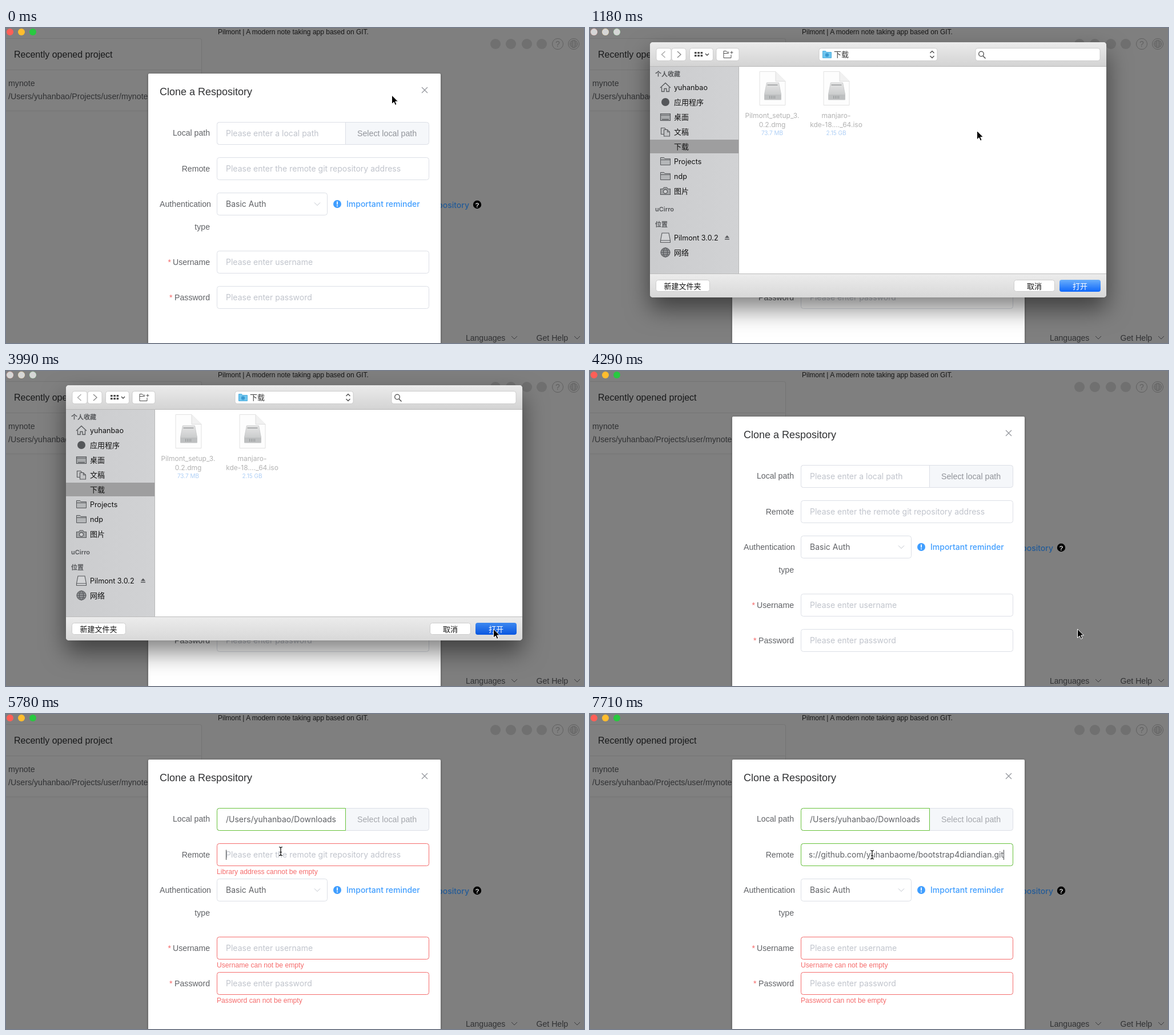
An HTML page that plays this animation: 1012x553 px, repeating every 8000 ms.

```html
<!DOCTYPE html>
<html lang="en">
<head>
<meta charset="utf-8">
<title>Clone a repository</title>
<style>
html, body { margin: 0; width: 100%; height: 100%; overflow: hidden; background: #7f7f7f; }
svg { display: block; width: 1012px; height: 553px; }
text { white-space: pre; }
.h { font-family: "Liberation Sans", Arial, sans-serif; }
.i { font-family: Inter, "Noto Sans CJK SC", "Noto Sans CJK", sans-serif; }
.c { font-family: "Noto Sans CJK SC", "Noto Sans CJK", sans-serif; }
.m { text-anchor: middle; }
.e { text-anchor: end; }
.b { font-weight: 500; }
.sb { font-weight: 600; }
#panelBox { filter: drop-shadow(0 20px 21px rgba(0, 0, 0, .5)); }
.btn { fill: #fff; stroke: #c4c4c4; stroke-width: .8; }
</style>
</head>
<body>
<svg id="stage" viewBox="0 0 1012 553">
<defs>
  <linearGradient id="bar" x2="0" y2="1"><stop stop-color="#ebebeb"/><stop offset="1" stop-color="#d3d3d3"/></linearGradient>
  <linearGradient id="foot" x2="0" y2="1"><stop stop-color="#ececec"/><stop offset="1" stop-color="#d8d8d8"/></linearGradient>
  <linearGradient id="side" x2="1" y2="0"><stop stop-color="#cbccce"/><stop offset="1" stop-color="#d1d2d4"/></linearGradient>
  <linearGradient id="blue" x2="0" y2="1"><stop stop-color="#69aefb"/><stop offset="1" stop-color="#0f68fb"/></linearGradient>
  <linearGradient id="down" x2="0" y2="1"><stop stop-color="#3d88f0"/><stop offset="1" stop-color="#0a57e0"/></linearGradient>
  <linearGradient id="disk" x2="0" y2="1"><stop stop-color="#e6e6e6"/><stop offset="1" stop-color="#bfc1c2"/></linearGradient>
  <clipPath id="field"><rect x="384" y="228" width="342" height="38"/></clipPath>
</defs>
</svg>
<script>
const LOOP = 8000, STEP = 148.2;
const USER = 'yuhanbao', APP = 'Pilmont';

const text = (x, y, s, size, fill, cls = 'h') =>
  `<text x="${x}" y="${y}" font-size="${size}" fill="${fill}" class="${cls}">${s}</text>`;
const rect = (x, y, w, h, fill, extra = '') =>
  `<rect x="${x}" y="${y}" width="${w}" height="${h}" fill="${fill}" ${extra}/>`;
const circle = (x, y, r, fill, extra = '') => `<circle cx="${x}" cy="${y}" r="${r}" fill="${fill}" ${extra}/>`;
const line = (d, stroke, w = 1, fill = 'none') => `<path d="${d}" stroke="${stroke}" stroke-width="${w}" fill="${fill}"/>`;
const group = (id, body) => `<g id="${id}">${body}</g>`;
const box = (y, stroke, x = 369, w = 372, fill = '#fff') =>
  rect(x + .5, y + .5, w - 1, 39, fill, `rx="4" stroke="${stroke}"`);
const globe = (x, y, r, c) => circle(x, y, r, 'none', `stroke="${c}"`) +
  `<ellipse cx="${x}" cy="${y}" rx="${r * .45}" ry="${r}" fill="none" stroke="${c}"/>` +
  line(`M${x - r} ${y}h${2 * r}M${x - r * .85} ${y - r / 2}h${r * 1.7}M${x - r * .85} ${y + r / 2}h${r * 1.7}`, c);

const lights = colors => colors.map((c, i) => circle(7 + 20 * i, 7, 6, c)).join('');

function backdrop() {
  const ink = '#18191a', grey = '#303133', icon = '#707070';
  return rect(0, 0, 1012, 553, '#7f7f7f') +
    text(371, 11, APP + ' | A modern note taking app based on GIT.', 12, '#161616') +
    rect(-4, 18.5, 346.5, 126.5, '#808080', 'rx="3" stroke="#747474"') +
    line('M0 73.5H342', '#757575') + line('M0 146H342', '#7a7a7a') +
    text(14, 52, 'Recently opened project', 16, ink) +
    text(4, 102, 'mynote', 14.2, grey) +
    text(4, 125, `/Users/${USER}/Projects/user/mynote`, 14.2, grey) +
    [857, 884, 912, 938].map(x => circle(x, 28, 9, icon)).join('') +
    circle(966, 28, 9.5, 'none', 'stroke="#606060"') + text(966, 33, '?', 14, '#606060', 'h m') +
    circle(994, 28, 9.5, 'none', 'stroke="#606060"') + globe(994, 28, 6.5, '#606060') +
    text(811, 316, 'repository', 14, '#225b98', 'i b e') +
    circle(825, 310, 7.2, '#000') + text(825, 314.5, '?', 11.5, '#ddd', 'h m sb') +
    text(805, 549, 'Languages', 14, grey) + text(928.5, 549, 'Get Help', 14.1, grey) +
    line('M885 541l5 5 5-5M995 541l5 5 5-5', '#3a3b3d');
}

function form() {
  const ink = '#606266', hint = '#c0c4cc', edge = '#dcdfe6', red = '#f56c6c', green = '#67c23a';
  const label = (y, s) => text(357, y, s, 14.1, ink, 'h e');
  const ph = (y, s) => text(385, y, s, 14, hint, 'i');
  const err = (y, s) => text(369, y, s, 12.15, red);
  const pathEdge = 'M594.5 165.5H373.5a4 4 0 0 0-4 4v31a4 4 0 0 0 4 4H594.5Z';
  return rect(249, 80, 512, 480, '#fff', 'rx="2" style="filter:drop-shadow(0 1px 2px #0005)"') +
    text(269, 118, 'Clone a Respository', 18, '#303133') +
    line('M728 104l10 10M738 104l-10 10', '#909399', 1.1) +
    label(189, 'Local path') + label(252, 'Remote') +
    text(269, 314, 'Authentication', 14.2, ink) + label(354, 'type') +
    label(416, 'Username') + label(478, 'Password') +
    text(283.5, 416, '*', 14, red) + text(286, 478, '*', 14, red) +
    box(165, edge, 369, 372, '#f5f7fa') + line(pathEdge, edge, 1, '#fff') +
    group('pick', text(615, 190, 'Select local path', 14.2, '#909399')) +
    box(227, edge) + box(289, edge, 369, 194) + box(391, edge) + box(453, edge) +
    text(385, 314, 'Basic Auth', 14, ink, 'i') + line('M540 306.5l5 5 5-5', hint) +
    circle(580, 309, 7, '#409eff') + rect(579.1, 304.5, 1.8, 5.5, '#fff') + circle(580, 312.3, 1.1, '#fff') +
    text(596, 314, 'Important reminder', 14, '#409eff', 'i b') +
    group('pathHint', ph(190, 'Please enter a local path')) +
    group('pathValue', text(385, 190, `/Users/${USER}/Downloads`, 14, ink, 'i')) +
    group('pathOk', line(pathEdge, green)) +
    group('errors', box(391, red) + box(453, red) +
      err(445, 'Username can not be empty') + err(507, 'Password can not be empty')) +
    group('remoteError', box(227, red) + err(281, 'Library address cannot be empty')) +
    group('remoteOk', box(227, green, 369, 372, 'none')) +
    group('remoteHint', ph(252, 'Please enter the remote git repository address')) +
    group('remoteValue', `<g clip-path="url(#field)">` +
      text(724, 252, `https://github.com/${USER}me/bootstrap4diandian.git`, 14, ink, 'i e') + '</g>') +
    ph(416, 'Please enter username') + ph(478, 'Please enter password') +
    rect(0, 238.5, 1, 17.5, '#404246', 'id="caret"');
}

function diskFile(x, lines, size) {
  return line(`M${x - 22.5} 76.5h28l17 17v42h-45Z`, '#e2e2e2', 1, '#fdfdfd') +
    line(`M${x + 5.5} 76.5v17h17`, '#dedede', 1, '#f1f1f1') +
    line(`M${x - 10} 96h21l4 20v10h-29v-10Z`, '#c4c6c7', .8, 'url(#disk)') +
    rect(x - 14, 117, 29, 8.5, '#bdbfc0', 'rx="1"') +
    rect(x - 9, 99, 18, 2, '#a9abac') + line(`M${x - 5} 119v5m3-5v5m3-5v5m3-5v5`, '#929596') +
    lines.map((s, i) => text(x - .5, 158 + 16 * i, s, 12, '#b2b2b2', 'i m')).join('') +
    text(x - .5, 188, size, 10, '#aecff6', 'i m');
}

function sidebar() {
  const ink = '#111', ic = '#55575a';
  const folder = y => line(`M123.5 ${y + 6.5}v-13h6l1.5 2h9.5v11Z`, ic, 1, '#b4b6b8') + line(`M123.5 ${y - 2.5}h17`, ic);
  const item = (y, s, cls = 'c') => text(147, y + (cls == 'c' ? 5 : 4.7), s, cls == 'c' ? 13 : 12.6, ink, cls);
  const head = (y, s) => text(114, y, s, 11, '#55575a', 'i sb');
  return rect(105, 68, 155, 364, 'url(#side)') + rect(105, 196, 155, 24, '#9e9e9f') +
    head(85, '个人收藏') + head(322, 'uCirro') + head(349, '位置') +
    item(104, USER, 'i') + item(130, '应用程序') + item(156, '桌面') + item(182, '文稿') + item(208, '下载') +
    item(234, 'Projects', 'i') + item(260, 'ndp', 'i') + item(286, '图片') +
    item(368, APP + ' 3.0.2', 'i') + item(394, '网络') +
    line('M123 105l9-8.5 9 8.5M125.5 104v7.5h4.5v-5h4v5h4.5v-7.5', ic, 1.3) +
    circle(132, 130, 7, ic) +
    line('M123.5 150.5h17v12h-17ZM124 153h16', ic, 1.2, '#a9abad') + line('M126 160.5h12', ic, 1.5) +
    line('M124.5 175.5h6l3 3v8h-9Z', ic, 1.1, '#c2c3c5') +
    line('M129.5 178.5h6l4 4v7.5h-10ZM135.5 178.5v4h4', ic, 1.1, '#c2c3c5') +
    folder(234) + folder(260) +
    line('M123.5 282.5h4l2-2.5h5l2 2.5h4v10h-17Z', ic, 1.1, '#a2a4a6') +
    circle(132, 287, 3.5, '#d0d1d3', `stroke="${ic}" stroke-width="1.3"`) +
    line('M126 360h12l2.5 13v3.5h-17v-3.5ZM123.5 373h17', ic, 1.1, '#d3d4d6') +
    line('M236 368.5l4-4.5 4 4.5Z', 'none', 0, ic) + rect(236, 370, 8, 1.5, ic) +
    circle(132, 394, 8.5, '#929497') + globe(132, 394, 8, ic) +
    rect(260, 68, 1, 364, '#b8b8b8');
}

function panel() {
  const ic = '#4c4c4c';
  const btn = (x, y, w, h = 20) => rect(x, y, w, h, '#fff', 'rx="4" class="btn"');
  const dots = [183, 188.3, 193.6].flatMap(x => [42, 47].map(y => rect(x, y, 3.6, 3.2, ic))).join('');
  return lights(['#d6d6d6', '#d6d6d6', '#d6d6d6']) +
    rect(105, 25, 799, 448, '#ececec', 'id="panelBox" rx="5"') +
    line('M105 68V30a5 5 0 0 1 5-5H899a5 5 0 0 1 5 5V68Z', 'none', 0, 'url(#bar)') +
    rect(105, 67, 799, 1, '#b9b9b9') + rect(260, 68, 644, 364, '#fff') + sidebar() +
    line('M105 432V468a5 5 0 0 0 5 5H899a5 5 0 0 0 5-5V432Z', 'none', 0, 'url(#foot)') +
    rect(105, 431, 799, 1, '#bcbcbc') +
    btn(116, 35.5, 26, 22) + btn(143, 35.5, 25, 22) + btn(174.5, 35.5, 41, 22) + btn(221, 35.5, 40, 22) +
    btn(401, 35.5, 207, 22) + btn(675, 35.5, 218, 22) +
    line('M131.5 41l-6 5.5 6 5.5', '#a8a8a8', 1.4) + line('M153 41l6 5.5-6 5.5', '#8a8a8a', 1.4) +
    dots + line('M202 45l3 3 3-3', ic, 1.5) +
    line('M247 47v5.5h-13v-12h4.5l1.5 2h3.5M234 44.5h9M245.5 43h5M248 40.5v5', ic) +
    line('M407.5 52.5v-12h5l1.5 2h8.5v10Z', '#4eaede', 1, '#6fc5ee') + circle(415, 47.5, 3.2, '#3b9ad0') +
    text(427, 51, '下载', 13, '#333', 'c') +
    line('M595.5 44l3.5-3.5 3.5 3.5M595.5 49l3.5 3.5 3.5-3.5', ic, 1.4) +
    circle(685, 45.5, 4.3, 'none', `stroke="${ic}" stroke-width="1.3"`) + line('M688 49l4.5 4.5', ic, 1.5) +
    diskFile(319.5, [APP + '_setup_3.', '0.2.dmg'], '73.7 MB') +
    diskFile(431.5, ['manjaro-', 'kde-18...._64.iso'], '2.15 GB') +
    btn(115.5, 442.5, 94) + text(162, 457.7, '新建文件夹', 13, '#111', 'c m') +
    btn(742.5, 442.5, 71) + text(778, 457.7, '取消', 13, '#111', 'c m') +
    rect(822, 442, 72, 21, 'url(#blue)', 'id="open" rx="4"') +
    text(858, 457.7, '打开', 13, '#fff', 'c m');
}

const stage = document.getElementById('stage');
stage.insertAdjacentHTML('beforeend',
  backdrop() + lights(['#ff5f57', '#ffbd2e', '#28c940']) + form() + group('panel', panel()) +
  group('arrow', line('M0 0V15.5L3.6 12L6 17.4L8.5 16.3L6.2 11H11Z', '#fff', 1, '#000')) +
  group('beam', ['#fff', '#000'].map((c, i) =>
    line('M-3-7.5q3 0 3 2V5.5q0 2-3 2M3-7.5q-3 0-3 2M3 7.5q-3 0-3-2M-2 1.5h4', c, i ? 1.2 : 2.8)).join('')));

const el = Object.fromEntries([...stage.querySelectorAll('[id]')].map(n => [n.id, n]));

// pointer path: step, x, y
const path = [
  [0, 675.5, 118], [5, 677, 174.5], [6, 677, 174.5], [8, 677.5, 180.5], [11, 743, 291], [12, 743, 291],
  [18, 844, 443], [20, 846, 451], [21, 848, 466], [22, 848, 466], [27, 853.5, 453], [29, 853.5, 453],
  [33, 798, 357], [34, 798, 357], [36, 610, 215], [37, 540, 171], [39, 481, 241], [45, 481, 241], [50, 494, 247]
];

// each leg starts quickly and slows down
function pointer(k) {
  const j = path.findIndex(p => p[0] > k);
  if (j < 0) return path.at(-1).slice(1);
  const [k0, x0, y0] = path[j - 1], [k1, x1, y1] = path[j];
  const u = (k - k0) / (k1 - k0), s = u * (2 - u);
  return [x0 + (x1 - x0) * s, y0 + (y1 - y0) * s];
}

const show = (id, v) => el[id].setAttribute('opacity', +v);
const ramp = (k, a, b) => Math.min(1, Math.max(0, (k - a) / (b - a)));

function draw(t) {
  const k = Math.floor((t + 13) / STEP);
  const open = k >= 8 && k < 29, filled = k >= 30, focused = k >= 39, pasted = k >= 50;
  const invalid = ramp(k, 29, 31), accepted = ramp(k, 49, 52);
  const [x, y] = pointer(k);
  const overField = !open && x > 369 && (y > 165 && y < 205 && x < 594 || y > 227 && y < 267 && x < 741);

  show('panel', open);
  el.open.setAttribute('fill', k >= 27 ? 'url(#down)' : 'url(#blue)');
  show('pick', focused ? .8 : 1);
  show('pathHint', !filled);
  show('pathValue', filled);
  show('pathOk', invalid);
  show('errors', invalid);
  show('remoteError', invalid * (1 - accepted));
  show('remoteOk', accepted);
  show('remoteHint', !pasted);
  show('remoteValue', pasted);
  show('caret', focused && (k < 43 || k >= 46));
  el.caret.setAttribute('x', pasted ? 724 : 385);
  for (const id of ['arrow', 'beam']) el[id].setAttribute('transform', `translate(${x} ${y})`);
  show('arrow', !overField);
  show('beam', overField);
}

const start = performance.now();
function tick() {
  draw((performance.now() - start) % LOOP);
  requestAnimationFrame(tick);
}
tick();
</script>
</body>
</html>
```
